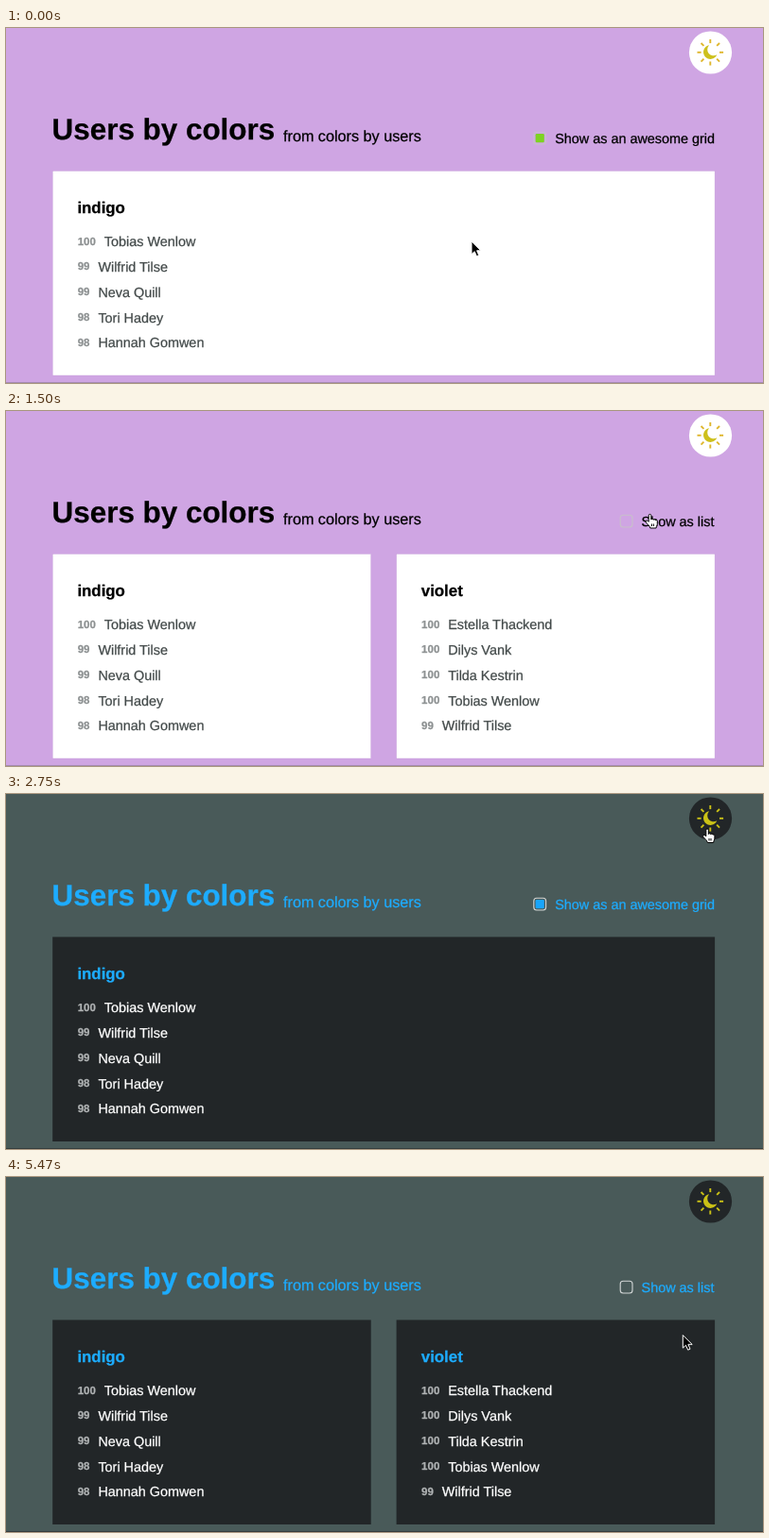
Recreate the animation shown at these times as an HTML page. Size 800x376 px, loop 5930 ms.

```html
<!DOCTYPE html>
<html lang="en">
<head>
<meta charset="utf-8">
<title>Users by colors</title>
<style>
  html, body { margin: 0; width: 100%; height: 100%; overflow: hidden; }
  svg {
    --page: #cfa5e3; --card: #fff; --edge: #c39bd6; --title: #000; --name: #434a4a; --score: #8c9091;
    --box: #c8c0ca; --tick: #7dd321; --moon: #cdc01c; --ray: #dfb62c; --line: #a58bb2;
    display: block; width: 100%; height: 100%; background: var(--page);
    font-family: "Liberation Sans", Arial, sans-serif; text-rendering: geometricPrecision;
  }
  svg.dark {
    --page: #495a59; --card: #222628; --edge: none; --title: #1dacff; --name: #fff; --score: #b0b3b4;
    --box: #d3d7d7; --tick: #18a5fb; --moon: #cbc216; --ray: #cbc216; --line: #343d3d;
  }
  text { fill: var(--ink); stroke: var(--ink); stroke-width: .25; }
  .title { --ink: var(--title); }
  .bold { font-weight: bold; }
  .name { --ink: var(--name); font-size: 14.4px; }
  .score { --ink: var(--score); font-size: 11.5px; font-weight: bold; }
  .card { fill: var(--card); stroke: var(--edge); stroke-width: .4; }
  .box { fill: none; stroke: var(--box); stroke-width: 1.1; }
</style>
</head>
<body>
<svg id="stage" viewBox="0 0 800 376">
  <circle cx="744.5" cy="26" r="22.6" fill="var(--card)"/>
  <g id="sun" transform="translate(744.3 25.8)" stroke="var(--ray)" stroke-width="1.9">
    <path d="M-1.2-7.6A7.4 7.4 0 1 0 7 2.4A6.5 6.5 0 0 1-1.2-7.6Z" fill="var(--moon)" stroke="none"/>
  </g>
  <text class="title bold" x="48.6" y="118.2" font-size="31.4">Users by colors</text>
  <text class="title" x="293" y="119.5" font-size="16.2">from colors by users</text>
  <g id="toggle">
    <rect class="box" x=".6" y="110.2" width="12.8" height="12.8" rx="3"/>
    <rect id="tick" x="2.4" y="112" width="9.2" height="9.2" rx="1.2" fill="var(--tick)"/>
    <text id="label" class="title" x="23" y="121.7" font-size="14.4"></text>
  </g>
  <g id="cards"></g>
  <rect y="375" width="800" height="1" fill="var(--line)"/>
  <path id="arrow" d="M0 0V13.6L3.2 10.7 5.4 15.7 7.7 14.7 5.6 9.8H9.8Z" stroke="#fff"/>
  <path id="hand" d="M3.8 8.3V1.7a1.3 1.3 0 0 1 2.6 0V6c.2-1 2.2-.9 2.4.3.4-.9 2.1-.7 2.2.5.5-.7 1.9-.4 1.9.9v2.8c0 1.5-1 2-1.2 4.5H5.4C5 12.5 2.4 11 .9 8.9-.2 7.4 1.8 6.4 2.9 7.4Z M7 10.5v2.5M9 10.5v2.5"
    fill="#fff" stroke="#000"/>
</svg>
<script>
const $ = id => document.getElementById(id);
const LOOP = 5930;

const groups = [
  ["indigo", [[100, "Tobias Wenlow"], [99, "Wilfrid Tilse"], [99, "Neva Quill"], [98, "Tori Hadey"], [98, "Hannah Gomwen"]]],
  ["violet", [[100, "Estella Thackend"], [100, "Dilys Vank"], [100, "Tilda Kestrin"], [100, "Tobias Wenlow"], [99, "Wilfrid Tilse"]]]
];

// time, x, y, pointer shape
const pointer = [
  [0, 492, 226, "arrow"], [250, 593, 136, "arrow"], [500, 624, 104, "hand"], [750, 629.3, 104.3, "arrow"],
  [1000, 652, 107, "hand"], [1250, 677, 108.5, "hand"], [1500, 675.4, 109, "hand"],
  [2000, 716, 90, "arrow"], [2250, 735, 60, "arrow"], [2500, 736, 36.5, "hand"],
  [3000, 734, 70, "arrow"], [3250, 721, 98, "arrow"], [3500, 703.1, 120.8, "hand"],
  [5000, 714, 158, "arrow"], [5470, 715.3, 167.5, "arrow"]
];

for (let angle = 0; angle < 360; angle += 45) {
  const ray = `<path d="M9.7 0H13.8" transform="rotate(${angle})"/>`;
  $("sun").insertAdjacentHTML("beforeend", ray);
}

function cardMarkup([title, users], column) {
  const rows = users.map(([score, name], i) => {
    const y = 231 + i * 26.85;
    const nameX = 35.4 + 6.4 * String(score).length;
    return `<text class="score" x="26.5" y="${y - 1.5}">${score}</text>
      <text class="name" x="${nameX}" y="${y}">${name}</text>`;
  });
  return `<g transform="translate(${49.2 + column * 363.4})">
    <rect class="card" y="151.4" width="336.5" height="216.6"/>
    <text class="title bold" x="26.2" y="196" font-size="16.85">${title}</text>${rows.join("")}</g>`;
}
$("cards").innerHTML = groups.map(cardMarkup).join("");
const [firstCard, secondCard] = $("cards").children;

function draw(now) {
  const t = now % LOOP;
  const grid = (t >= 750 && t < 2000) || t >= 3750;
  $("stage").classList.toggle("dark", t >= 2750);

  firstCard.firstElementChild.setAttribute("width", grid ? 336.5 : 699.9);
  secondCard.style.display = grid ? "" : "none";
  $("tick").style.display = grid ? "none" : "";
  $("label").textContent = grid ? "Show as list" : "Show as an awesome grid";
  $("toggle").setAttribute("transform", `translate(${grid ? 648.6 : 557.2})`);

  const [, x, y, shape] = pointer.findLast(step => step[0] <= t);
  for (const id of ["arrow", "hand"]) {
    $(id).style.display = id === shape ? "" : "none";
    $(id).setAttribute("transform", `translate(${x} ${y})`);
  }
}

const start = performance.now();
function tick() {
  draw(performance.now() - start);
  requestAnimationFrame(tick);
}
tick();
</script>
</body>
</html>
```
